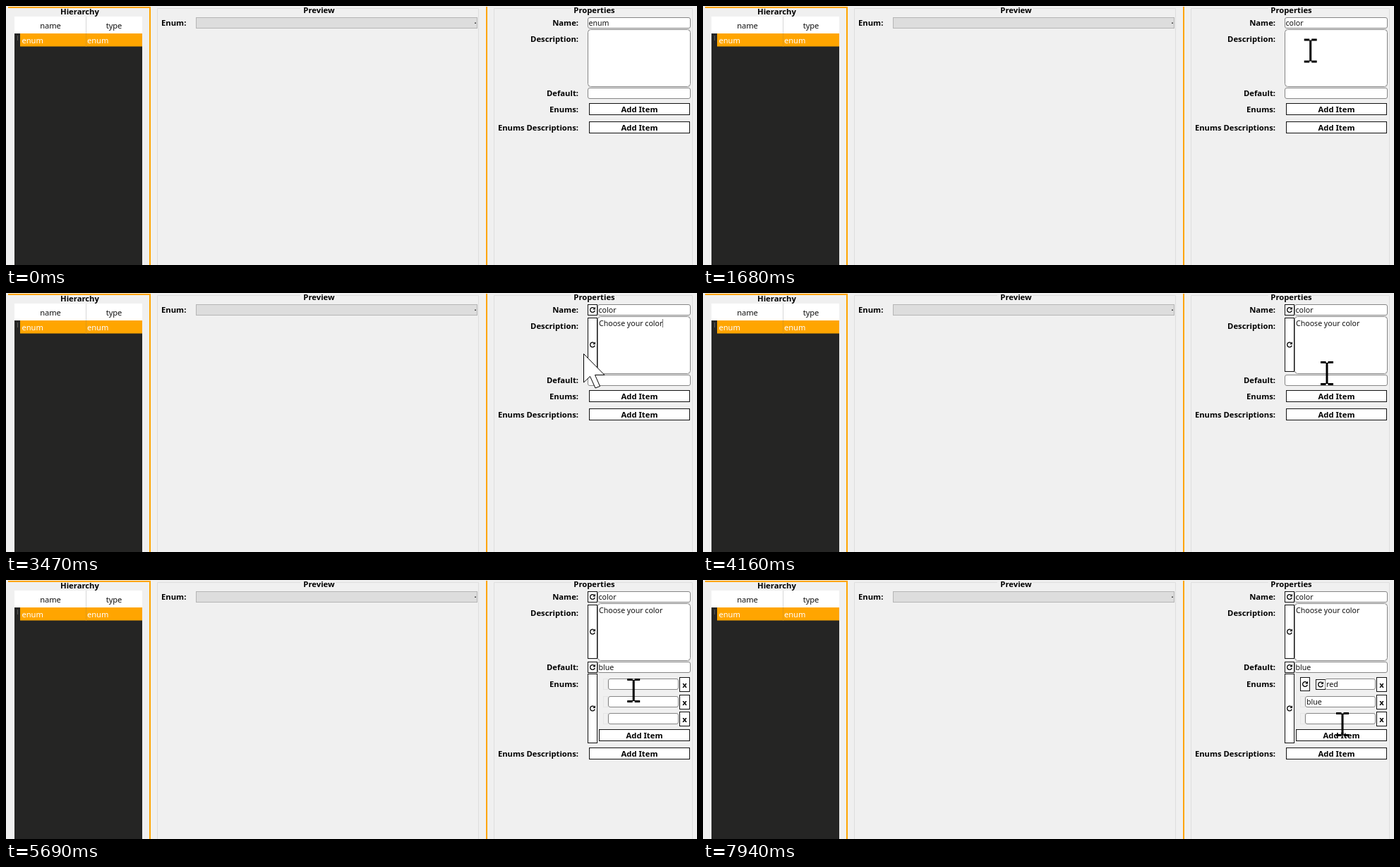
These frames come from a looping animation (979x368 px, 7.99 s). An HTML page:

```html
<!DOCTYPE html>
<html lang="en">
<head>
<meta charset="utf-8">
<title>Enum editor</title>
<style>
  html, body { margin: 0; width: 100%; height: 100%; overflow: hidden; background: #f0f0f0; }
  svg { display: block; width: 979px; height: 368px; }
  text { font: 10.6px "Noto Sans", "Open Sans", sans-serif; fill: #111; white-space: pre; }
  .b { font-weight: 700; font-size: 11.25px; fill: #000; }
  .tree { font-size: 11.1px; }
  .light { fill: #fff; }
  .end { text-anchor: end; }
  .mid { text-anchor: middle; }
</style>
</head>
<body>
<svg viewBox="0 0 979 368">
  <g id="base"></g>
  <g id="form"></g>
  <g id="cursor">
    <circle id="halo" r="31" fill="#ff0" fill-opacity=".5"/>
    <path id="arrow" d="M.5 .5V41L9.5 32.5L17 49L23.5 46.5L16.5 30.5H30Z" fill="#fff" stroke="#000"/>
    <path id="beam" d="M-9 -15.5h7.5M9 -15.5h-7.5M0 -15V15M-9 15.5h7.5M9 15.5h-7.5" stroke="#000" stroke-width="3"/>
  </g>
</svg>
<script>
const LOOP = 7990, KEY = 50, CLICK = 130;
const ORANGE = '#ffa500';
const LEFT = 824, RIGHT = 970, LABEL = 811, PITCH = 24.5;
const $ = id => document.getElementById(id);

// The pointer's journey, one leg per move
const legs = [];
function leg(start, end, x, y, tool, action = '') {
  const made = { start, end, x, y, tool, action };
  legs.push(made);
  return made;
}
leg(30, 30, 912, 345, 'arrow');
leg(30, 330, 905, 25, 'beam');
const drag = leg(450, 690, 701, 25, 'arrow', 'drag');
leg(830, 970, 725, 11, 'arrow');
const toAbout = leg(1500, 1790, 883, 72, 'beam', 'click');
leg(3120, 3470, 818, 86, 'arrow');
leg(3570, 3840, 848, 104, 'beam');
leg(3940, 4030, 884, 114, 'beam', 'click');
const adds = [
  leg(4640, 4800, 909, 146, 'arrow', 'click'),
  leg(4980, 5080, 909, 167, 'arrow', 'click'),
  leg(5250, 5290, 910, 202, 'arrow', 'click')
];
leg(5460, 5850, 885, 148, 'beam', 'click');
leg(6490, 6590, 833, 166, 'arrow');
const toSecond = leg(6690, 6950, 886, 168, 'beam', 'click');
leg(7700, 7900, 906, 205, 'beam');

const clicked = (l, t) => t >= l.end + CLICK;
const easeOut = k => 1 - (1 - k) ** 2;
const typed = (s, t, start) => s.slice(0, Math.max(0, Math.floor((t - start) / KEY) + 1));

function pointer(t) {
  const i = legs.findLastIndex(l => t >= l.start);
  if (i < 1) return { x: -99, y: -99, tool: 'arrow', pressed: false };
  const from = legs[i - 1], to = legs[i];
  const k = Math.min(1, (t - to.start) / (to.end - to.start)), e = easeOut(k);
  return {
    x: from.x + (to.x - from.x) * e,
    y: from.y + (to.y - from.y) * e,
    tool: k < .5 ? from.tool : to.tool,
    pressed: to.action === 'drag' ? k < 1
      : to.action === 'click' && t >= to.end && !clicked(to, t)
  };
}

const rect = (x, y, w, h, fill, extra = '') =>
  `<rect x="${x}" y="${y}" width="${w}" height="${h}" fill="${fill}" ${extra}/>`;
const text = (s, x, y, cls = '') => `<text x="${x}" y="${y}" class="${cls}">${s}</text>`;
const label = (s, y) => text(s, LABEL, y, 'b end');

// Outlined box; right and bottom are exclusive pixel edges
const box = (x, y, right, bottom, fill = '#fff', stroke = '#111', r = 0) =>
  rect(x + .5, y + .5, right - x - 1, bottom - y - 1, fill, `rx="${r}" stroke="${stroke}"`);
const field = (x, y, right, bottom, r = 2.5) => box(x, y, right, bottom, '#fff', '#858585', r);

const reset = (x, y, right, bottom) => box(x, y, right, bottom) +
  `<g transform="translate(${(x + right) / 2} ${(y + bottom) / 2})">
    <path d="M2.3 -2.5A3.4 3.4 0 1 0 3.3 1" fill="none" stroke="#000" stroke-width="1.3"/>
    <path d="M4 -4.3V-.5H.2Z"/></g>`;

function button(x, y, at) {
  const right = RIGHT - 1, bottom = y + 17;
  const hot = at.x > x && at.x < right && at.y > y && at.y < bottom;
  return box(x, y, right, bottom, hot ? ORANGE : '#fff') +
    text('Add Item', (x + right) / 2, y + 12.5, hot ? 'b mid light' : 'b mid');
}

function panel(title, x, right, gap) {
  const mid = (x + right) / 2;
  return `<path d="M${x} 368V3.5H${mid - gap}M${mid + gap} 3.5H${right}V368" fill="none" stroke="#dedede"/>` +
    text(title, mid + 1.5, 10, 'b mid');
}

function base() {
  return rect(0, 0, 979, 368, '#f0f0f0') +
    panel('Preview', 214.5, 669.5, 25) + panel('Properties', 691.5, 972.5, 31) +
    rect(3, 1, 202, 2, ORANGE) + rect(203, 1, 2, 367, ORANGE) + rect(680, 1, 2, 367, ORANGE) +
    text('Hierarchy', 104.5, 12, 'b mid') +
    rect(12, 15, 181, 24, '#fff') + rect(113, 15, 1, 24, '#d8d8d8') +
    text('name', 63, 31.5, 'tree mid') + text('type', 153, 31.5, 'tree mid') +
    rect(12, 39, 181, 329, '#252524') + rect(20, 39, 173, 18.5, ORANGE) +
    rect(113, 39, 1, 18.5, '#e39a14') + rect(16, 42, 1, 7, '#5a5a5a') +
    text('enum', 22.5, 53, 'tree light') + text('enum', 115, 53, 'tree light') +
    text('Enum:', 220, 28, 'b') + box(269, 16, 668, 32, '#ddd', '#b5b5b5') +
    rect(664, 23.5, 2, 1.5, '#444') +
    label('Name:', 28) + label('Description:', 51) + label('Default:', 128);
}

// One-line input, with its reset button once it has been edited
function entry(s, y, edited) {
  const x = edited ? LEFT + 14 : LEFT;
  return (edited ? reset(LEFT, y, x, y + 16) : '') + field(x, y, RIGHT, y + 16) +
    text(s, x + 1.5, y + 12);
}

function item(s, y, edited) {
  const x = edited ? 881 : 853;
  return (edited ? reset(846, y, 860, y + 20) + reset(868, y + 3, 882, y + 18)
                 : box(846, y + 2, 853, y + 18, 'none', '#e6e6e6')) +
    field(x, y + 2, 953, y + 18) + text(s, x + 2, y + 14) +
    box(954, y, RIGHT - 1, y + 21) + text('x', 961.5, y + 14.5, 'b mid');
}

function form(t, at) {
  const typing = 1110, renamed = t >= typing;
  let out = entry(renamed ? typed('color', t, typing) : 'enum', 16, clicked(toAbout, t));
  if (t >= drag.start && !renamed) {
    const x = Math.max(LEFT + 1.5, at.x), width = Math.max(0, LEFT + 31 - x);
    out += rect(x, 18, width, 12, '#0078d7') + (width > 20 ? text('enum', LEFT + 1.5, 28, 'light') : '');
  }

  const about = typed('Choose your color', t, 2320), x = about ? LEFT + 14 : LEFT;
  out += (about ? reset(LEFT, 35, x, 112) : '') + field(x, 33, RIGHT, 115, 4) + text(about, x + 2, 46.5);
  if (t >= 3120 && t < 3600) out += rect(930, 37, 1, 12, '#777');

  out += entry(typed('blue', t, 4360), 116, clicked(adds[0], t));

  const count = adds.filter(a => clicked(a, t)).length;
  const row = i => 138 + Math.round(i * PITCH);
  const words = [typed('red', t, 6260), typed('blue', t, 7290), ''];
  if (count) out += reset(LEFT, 133, LEFT + 14, row(count) + 20);
  for (let i = 0; i < count; i++) out += item(words[i], row(i), i === 0 && clicked(toSecond, t));

  const addY = row(count), nextY = addY + 26;
  return out + label('Enums:', count ? 151.5 : 150.5) + button(count ? 840 : 826, addY, at) +
    label('Enums Descriptions:', nextY + 13) + button(826, nextY, at);
}

let last = '';
const show = (id, on) => { $(id).style.display = on ? '' : 'none'; };
function draw(t) {
  const at = pointer(t), markup = form(t, at);
  if (markup !== last) $('form').innerHTML = last = markup;
  $('cursor').setAttribute('transform', `translate(${at.x.toFixed(1)} ${at.y.toFixed(1)})`);
  show('halo', at.pressed);
  show('beam', at.tool === 'beam');
  show('arrow', at.tool === 'arrow');
}

$('base').innerHTML = base();
const start = performance.now();
function tick() {
  draw((performance.now() - start) % LOOP);
  requestAnimationFrame(tick);
}
tick();
</script>
</body>
</html>
```
